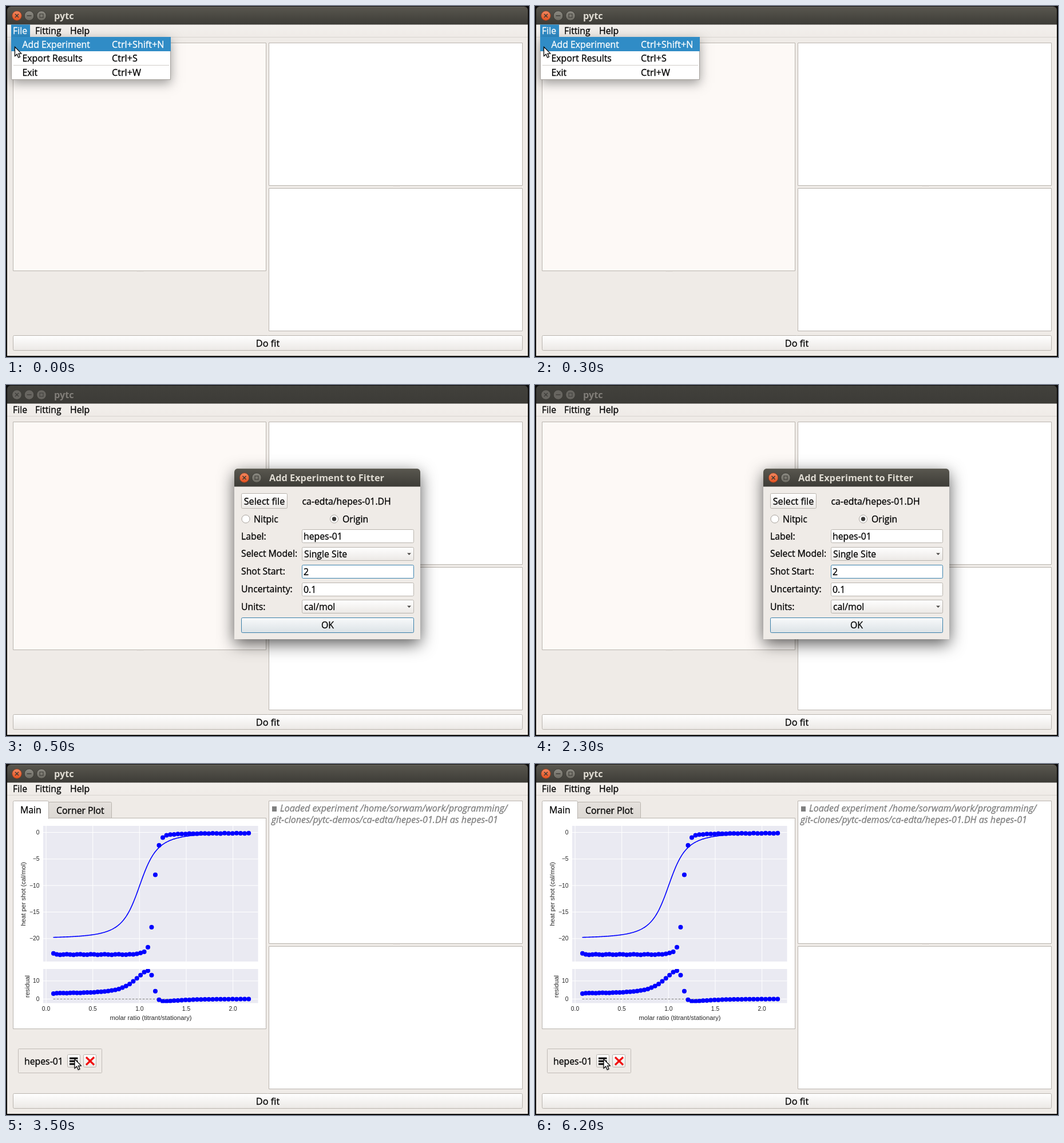
Animation, 914 px wide and 613 px high, one loop 8000 ms. Source, as an HTML page with a canvas:

```html
<!DOCTYPE html>
<html lang="en">
<head>
<meta charset="utf-8">
<title>pytc</title>
<style>
html, body { margin: 0; width: 100%; height: 100%; overflow: hidden; background: #0b0a09; }
canvas { display: block; }
</style>
</head>
<body>
<canvas id="stage" width="914" height="613"></canvas>
<script>
const ctx = document.getElementById('stage').getContext('2d');
const LOOP = 8000;
const UI = '"Open Sans", "Noto Sans", sans-serif';
const PLOT = '"Liberation Sans", Arial, sans-serif';
const BG = '#efebe7', EDGE = '#b9b4ae', BLUE = '#308cc6', INK = '#0000ff';

function text(str, x, y, { size = 15.8, color = '#000', style = '', family = UI, align = 'left', base = 'alphabetic' } = {}) {
  ctx.font = `${style} ${size}px ${family}`;
  ctx.fillStyle = color;
  ctx.textAlign = align;
  ctx.textBaseline = base;
  ctx.fillText(str, x, y);
  if (family !== UI || style === 'bold') return;
  // A hairline gives the interface text a slightly heavier weight.
  ctx.strokeStyle = color;
  ctx.lineWidth = 0.3;
  ctx.strokeText(str, x, y);
}

function rect(x, y, w, h, fill) {
  ctx.fillStyle = fill;
  ctx.fillRect(x, y, w, h);
}

// Bordered box whose outline lies on whole pixels.
function box(x, y, w, h, fill, edge = EDGE, radius = 0) {
  ctx.beginPath();
  ctx.roundRect(x + 0.5, y + 0.5, w - 1, h - 1, radius);
  ctx.fillStyle = fill;
  ctx.fill();
  ctx.strokeStyle = edge;
  ctx.lineWidth = 1;
  ctx.stroke();
}

function line(points, color, width = 1) {
  ctx.beginPath();
  points.forEach(([x, y]) => ctx.lineTo(x, y));
  ctx.strokeStyle = color;
  ctx.lineWidth = width;
  ctx.stroke();
}

function disc(x, y, r, fill, edge) {
  ctx.beginPath();
  ctx.arc(x, y, r, 0, Math.PI * 2);
  ctx.fillStyle = fill;
  ctx.fill();
  if (!edge) return;
  ctx.strokeStyle = edge;
  ctx.lineWidth = 1;
  ctx.stroke();
}

function fade(y, h, top, bottom) {
  const g = ctx.createLinearGradient(0, y, 0, y + h);
  g.addColorStop(0, top);
  g.addColorStop(1, bottom);
  return g;
}

function shadow(color, blur, dy, draw) {
  ctx.save();
  ctx.shadowColor = color;
  ctx.shadowBlur = blur;
  ctx.shadowOffsetY = dy;
  draw();
  ctx.restore();
}

function button(x, y, w, h, edge = EDGE, top = '#ffffff', bottom = '#ebe8e5') {
  box(x, y, w, h, fade(y, h, top, bottom), edge, 2);
}

function titleBar(x, y, w, h, label, labelX, active) {
  ctx.beginPath();
  ctx.roundRect(x, y, w, h, [6, 6, 0, 0]);
  ctx.fillStyle = active ? fade(y, h, '#59574f', '#3d3c37') : fade(y, h, '#42413c', '#3c3b37');
  ctx.fill();
  if (active) rect(x + 6, y, w - 12, 1, '#6a685f');
  text(label, labelX, y + 22, { size: 16.3, style: 'bold', color: active ? '#dfdbd2' : '#807d78' });
}

function windowButton(kind, x, y, active) {
  const lit = active && kind === 'close';
  const mark = active ? '#3a3934' : '#3f3e3a';
  const fill = lit ? fade(y - 8, 16, '#f3875f', '#e4511f')
    : active ? fade(y - 8, 16, '#8b8981', '#6d6b63') : '#676560';
  disc(x, y, 8.4, fill, lit ? '#7a3d26' : '#3a3934');
  if (kind === 'close') {
    line([[x - 3, y - 3], [x + 3, y + 3]], mark, 1.4);
    line([[x + 3, y - 3], [x - 3, y + 3]], mark, 1.4);
  } else if (kind === 'min') {
    line([[x - 4, y], [x + 4, y]], mark, 1.4);
  } else {
    ctx.strokeStyle = mark;
    ctx.strokeRect(x - 3, y - 3, 6, 6);
  }
}

function splitterDots(x, y) {
  for (let i = 0; i < 6; i++) {
    rect(x + i * 2, y, 1, 1, '#d6d1cc');
    rect(x + i * 2, y + 1, 1, 1, '#fbf9f7');
  }
}

function cursor(x, y) {
  ctx.save();
  ctx.translate(x, y);
  ctx.beginPath();
  [[0, 0], [0, 16], [3.7, 12.6], [6.3, 18.4], [9, 17.2], [6.4, 11.6], [11.3, 11.4]]
    .forEach(([px, py]) => ctx.lineTo(px, py));
  ctx.closePath();
  ctx.shadowColor = 'rgba(0,0,0,.35)';
  ctx.shadowBlur = 3;
  ctx.shadowOffsetY = 1;
  ctx.fillStyle = '#fff';
  ctx.fill();
  ctx.shadowColor = 'transparent';
  ctx.strokeStyle = '#000';
  ctx.lineWidth = 1.2;
  ctx.stroke();
  ctx.restore();
}

function mainWindow(active) {
  rect(0, 0, 914, 613, '#0b0a09');
  rect(2, 30, 910, 581, BG);
  rect(2, 32, 910, 22, fade(32, 22, '#f3f0ed', BG));
  titleBar(2, 1, 910, 31.5, 'pytc', 84, active);
  ['close', 'min', 'max'].forEach((kind, i) => windowButton(kind, 19 + i * 21.5, 17, active));
  rect(2, 54, 910, 1, '#d9d5d0');
  text('File', 12, 49);
  text('Fitting', 51, 49);
  text('Help', 112, 49);
  box(459, 64, 444, 250, '#fff');
  box(459, 318, 444, 250, '#fff');
  box(12, 64, 443, 399, '#fdf9f6');
  splitterDots(229, 464);
  splitterDots(677, 315);
  button(12, 575, 891, 27);
  text('Do fit', 457.5, 594.5, { align: 'center', size: 16.3 });
}

function menuScene() {
  mainWindow(true);
  rect(9, 32.5, 33, 22.5, BLUE);
  text('File', 12, 49, { color: '#fff' });
  shadow('rgba(0,0,0,.38)', 18, 6, () => rect(9, 54, 279, 75, '#fff'));
  box(9, 54, 279, 75, '#fff', '#a5a19c');
  rect(9, 54, 279, 25, BLUE);
  rect(13, 103, 272, 1, '#d0ccc8');
  const rows = [
    ['Add Experiment', 'Ctrl+Shift+N', 72.5, '#fff'],
    ['Export Results', 'Ctrl+S', 96.5, '#000'],
    ['Exit', 'Ctrl+W', 122, '#000']
  ];
  for (const [name, keys, y, color] of rows) {
    text(name, 28.5, y, { color });
    text(keys, 185, y, { color, size: 16.2 });
  }
  cursor(15.5, 71.5);
}

function field(y, value, edge) {
  box(517, y, 196, 24, '#fff', edge, 2);
  text(value, 520, y + 17.5);
}

function combo(y, value) {
  button(517, y, 196, 24);
  text(value, 521, y + 17.5);
  ctx.beginPath();
  ctx.moveTo(701, y + 10.5);
  ctx.lineTo(708, y + 10.5);
  ctx.lineTo(704.5, y + 14);
  ctx.fillStyle = '#4a4845';
  ctx.fill();
}

function radio(x, label, labelX, on) {
  disc(x, 234, 7, '#fff', '#a8a39d');
  if (on) disc(x, 234, 3.7, '#3c3b39');
  text(label, labelX, 239.5);
}

function dialogScene() {
  mainWindow(false);
  shadow('rgba(0,0,0,.65)', 28, 8, () => {
    ctx.beginPath();
    ctx.roundRect(399, 146, 325, 298, [6, 6, 0, 0]);
    ctx.fillStyle = BG;
    ctx.fill();
  });
  titleBar(399, 146, 325, 31.5, 'Add Experiment to Fitter', 460, true);
  windowButton('close', 416.5, 162, true);
  windowButton('max', 438, 162, true);
  button(411, 189, 81, 27);
  text('Select file', 451.5, 208.5, { size: 16.2, align: 'center' });
  text('ca-edta/hepes-01.DH', 517.5, 208.5);
  radio(419, 'Nitpic', 433, false);
  radio(573.5, 'Origin', 588, true);
  ['Label:', 'Select Model:', 'Shot Start:', 'Uncertainty:', 'Units:']
    .forEach((label, i) => text(label, 411, 269.5 + i * 30.8));
  field(252, 'hepes-01');
  combo(283, 'Single Site');
  field(314, '2', '#3b82ad');
  field(345, '0.1');
  combo(375, 'cal/mol');
  button(411, 406, 302, 27, '#397fa9', '#f9fafb', '#dbe2e6');
  text('OK', 562, 425, { align: 'center' });
}

// Plot coordinates
const px = v => 70 + v * 163.3;
const ratioAt = x => (x - 70) / 163.3;
const heatY = v => 119.5 - v * 9.27;
const residY = v => 410.5 - v * 3.17;

// Single-site binding isotherm, heat per shot.
function model(ratio) {
  const r = 0.01, x = ratio / 1.012;
  return -10 * (1 + (1 - x - r) / Math.sqrt((1 + x + r) ** 2 - 4 * x));
}

const STEP = [331.5, 330, 328, 320, 285, 193.5, 142, 128.5, 124.5, 123.3];

function shots() {
  const list = [];
  for (let k = -27; k <= 26; k++) {
    const x = 248 + 6.45 * k + 0.0125 * k * k;
    let y = STEP[k + 3];
    if (k < -3) y = (k === -27 ? 331.2 : 332.7) + 0.5 * Math.sin(k * 1.7);
    if (k > 6) y = 121 + 1.7 * Math.exp(-(k - 7) / 5) + 0.3 * Math.sin(k * 2.1);
    list.push({ x, y, residual: model(ratioAt(x)) - (119.5 - y) / 9.27 });
  }
  return list;
}

function axes(y, h, ticks, toY) {
  rect(65, y, 375.5, h, '#eaeaf2');
  for (let v = 0; v <= 2; v += 0.5) line([[px(v), y], [px(v), y + h]], '#fff', 1);
  for (const v of ticks) {
    line([[65, toY(v)], [440.5, toY(v)]], '#fff', 1);
    tick(String(v).replace('-', '\u2212'), 58.5, toY(v), 'right');
  }
}

function tick(str, x, y, align) {
  text(str, x, y + 0.5, { size: 10.3, color: '#262626', family: PLOT, align, base: 'middle' });
}

function axisLabel(str, x, y, turn) {
  ctx.save();
  ctx.translate(x, y);
  ctx.rotate(turn);
  text(str, 0, 0, { size: 11.2, color: '#262626', family: PLOT, align: 'center', base: 'middle' });
  ctx.restore();
}

function clipped(y, h, draw) {
  ctx.save();
  ctx.beginPath();
  ctx.rect(65, y, 375.5, h);
  ctx.clip();
  draw();
  ctx.restore();
}

function plot() {
  const data = shots();
  axes(108, 237, [0, -5, -10, -15, -20], heatY);
  axes(358, 59.5, [0, 10], residY);
  for (let v = 0; v <= 2; v += 0.5) tick(v.toFixed(1), px(v), 428, 'center');
  axisLabel('heat per shot (cal/mol)', 30.5, 227, -Math.PI / 2);
  axisLabel('residual', 38, 388.5, -Math.PI / 2);
  axisLabel('molar ratio (titrant/stationary)', 253, 443.5, 0);
  clipped(108, 237, () => {
    const curve = [];
    for (let x = 82.5; x <= 424; x += 1.5) curve.push([x, heatY(model(ratioAt(x)))]);
    line(curve, INK, 1.6);
    data.forEach(p => disc(p.x, p.y, 4, INK));
  });
  clipped(358, 59.5, () => {
    ctx.setLineDash([4, 2]);
    line([[82.5, 410.5], [424, 410.5]], '#808080', 1);
    ctx.setLineDash([]);
    data.forEach(p => disc(p.x, residY(p.residual), 4, INK));
  });
}

function resultScene() {
  mainWindow(true);
  rect(12, 64, 443, 30, BG);
  box(12, 94, 443, 369, '#fff');
  box(74, 66, 111, 29, fade(66, 29, '#e5e1dd', '#dcd8d3'), EDGE, [2, 2, 0, 0]);
  box(12, 64, 63, 32, '#fff', EDGE, [2, 2, 0, 0]);
  rect(13, 94, 61, 3, '#fff');
  rect(12, 94, 1, 3, EDGE);
  text('Main', 25, 85.5);
  text('Corner Plot', 88, 86.5);
  plot();

  const note = { size: 16.1, style: 'italic', color: '#7f7f7f' };
  rect(465, 74, 8, 9, '#7f7f7f');
  text('Loaded experiment /home/sorwam/work/programming/', 479, 83, note);
  text('git-clones/pytc-demos/ca-edta/hepes-01.DH as hepes-01', 464, 103, note);

  box(21, 497, 147, 43, BG, '#c0bbb6', 1);
  text('hepes-01', 32, 525);
  button(107, 507, 23, 23);
  for (let i = 0; i < 3; i++) rect(111, 512.5 + i * 5, 14.5, 3, '#000');
  button(135, 507, 23, 23);
  line([[140, 512], [154, 525.5]], '#f00d0d', 3.2);
  line([[154, 512], [140, 525.5]], '#f00d0d', 3.2);
  cursor(120, 515.5);
}

let shown = null;
function frame(now) {
  const t = now % LOOP;
  const scene = t < 500 ? menuScene : t < 3500 ? dialogScene : resultScene;
  if (scene !== shown) {
    scene();
    shown = scene;
  }
  requestAnimationFrame(frame);
}
frame(0);
</script>
</body>
</html>
```
